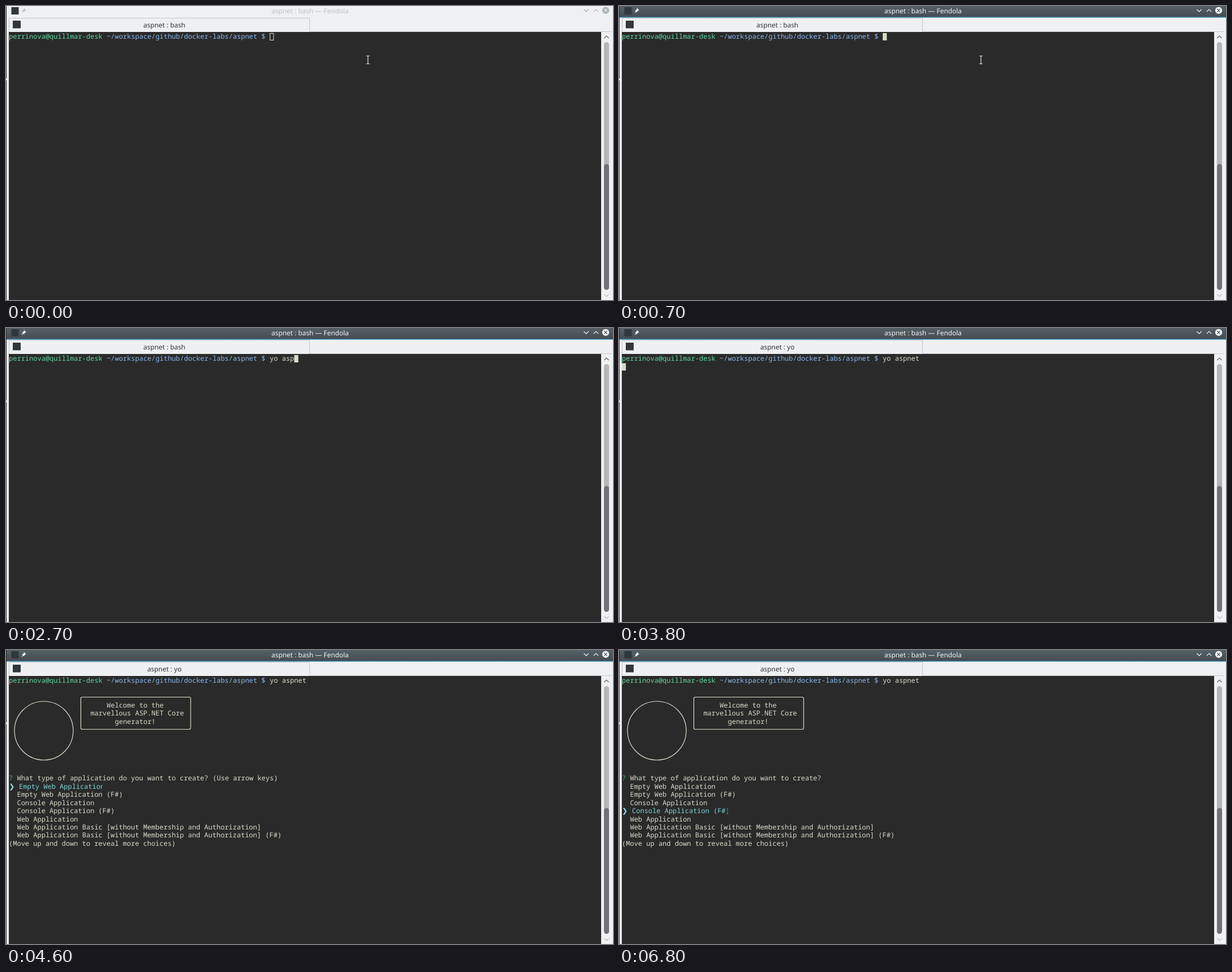
Recreate the animation shown at these times as an HTML page. Size 1075 px wide and 521 px high, loop 8 s.

```html
<!DOCTYPE html>
<html lang="en">
<head>
<meta charset="utf-8">
<title>Terminal</title>
<style>
  html, body { margin: 0; width: 100%; height: 100%; overflow: hidden; background: #eff0f1; }
  svg { display: block; width: 100%; height: 100%; }
  text { white-space: pre; text-rendering: geometricPrecision; }
  .ui { font: 11.9px "Noto Sans", sans-serif; text-anchor: middle; }
  .mono { font: 12.03px "Noto Sans Mono", monospace; }
  .line { fill: none; stroke-width: 1.2; }
</style>
</head>
<body>
<svg viewBox="0 0 1075 521" preserveAspectRatio="none">
  <defs>
    <linearGradient id="bar" x2="0" y2="1">
      <stop id="barTop"/>
      <stop id="barEnd" offset="1"/>
    </linearGradient>
    <clipPath id="pickClip"><rect id="pickBox" x="5" height="16"/></clipPath>
  </defs>
  <rect width="1075" height="521" fill="#eff0f1"/>

  <!-- title bar -->
  <g id="active">
    <rect width="1075" height="20" fill="url(#bar)"/>
    <rect y="19.6" width="1075" height="1.2" fill="#46a9d6"/>
  </g>
  <rect x="9.5" y="2" width="13" height="13" fill="#31373b"/>
  <g id="pin">
    <path d="M31.7 4.2L36 8.3L34 8.6L32.2 10.5L31.9 12L28.2 8.3L29.8 8L31.6 6.2Z" transform="translate(0 -.6)"/>
    <path d="M30.5 9L28 11.8" stroke-width="1.1"/>
  </g>
  <text id="title" class="ui" x="538.5" y="12.8">aspnet : bash — Fendola</text>
  <g id="buttons" class="line">
    <path d="M1023.3 6L1027.5 10.2L1031.7 6M1040.8 10.2L1045 6L1049.2 10.2"/>
  </g>
  <circle id="close" cx="1062" cy="7.8" r="6.1"/>
  <path id="cross" class="line" d="M1059.2 5L1064.8 10.6M1064.8 5L1059.2 10.6"/>

  <!-- tab bar -->
  <path class="line" d="M5.5 46V21.5H537.5V45.5H1072" stroke="#c3c5c7" style="stroke-width:1"/>
  <rect x="12" y="26" width="14" height="13.5" fill="#31373b"/>
  <text id="tab" class="ui" x="280.5" y="37.8" fill="#31363b"></text>

  <!-- terminal and scroll bar -->
  <rect x="5" y="46" width="1049" height="475" fill="#2a2a2a"/>
  <rect x="1059" y="64" width="9" height="439" rx="4.5" fill="#b5b6b8"/>
  <rect x="1059" y="280" width="9" height="223" rx="4.5" fill="#717177"/>
  <path class="line" d="M1059.5 57L1063.5 53L1067.5 57" stroke="#5c6165"/>
  <path class="line" d="M1059.5 511L1063.5 515L1067.5 511" stroke="#b9bcbe"/>
  <rect width="1" height="521" fill="#2b2b2b"/>
  <rect y="128.5" width="1" height="3" fill="#fff"/>

  <g id="prompt" class="mono"></g>
  <g id="greeting" class="mono">
    <circle class="line" cx="67" cy="143" r="52" stroke="#dcdccc"/>
    <rect class="line" x="132.5" y="83.5" width="194.5" height="57" rx="2.5" stroke="#dcdccc"/>
  </g>
  <g id="menu" class="mono">
    <g clip-path="url(#pickClip)"><text id="pick" x="23" fill="#7fd3d8"></text></g>
    <text id="arrow" x="5.2" fill="#8fe3ea" style="font-family:'DejaVu Sans',sans-serif">❯</text>
  </g>
  <rect id="cursor" width="7.2" height="13"/>

  <g id="pointer" class="line" stroke="#e8e8e8">
    <path d="M638 88.5H640L641 89.3L642 88.5H644M641 89V102M638 102.5H640L641 101.7L642 102.5H644"/>
  </g>
</svg>
<script>
const LOOP = 8000, CELL = 7.22, ROW = 14.42, CREAM = '#dcdccc';
const COMMAND = 'yo aspnet', PROMPT_COLS = 64, FIRST = 13;
const CHOICES = [
  'Empty Web Application',
  'Empty Web Application (F#)',
  'Console Application',
  'Console Application (F#)',
  'Web Application',
  'Web Application Basic [without Membership and Authorization]',
  'Web Application Basic [without Membership and Authorization] (F#)'
];
// [time, characters typed]
const KEYS = [[0, 0], [1100, 1], [1500, 2], [2400, 4], [2500, 5], [2700, 6], [2900, 7], [3000, 8], [3200, 9]];
const PICKS = [[0, 0], [6400, 1], [6600, 2], [6800, 3]];

const $ = id => document.getElementById(id);
const colX = col => 5 + col * CELL;
const baseY = row => 58.4 + row * ROW;
const valueAt = (steps, t) => steps.filter(s => s[0] <= t).pop()[1];
const show = (id, on) => $(id).setAttribute('visibility', on ? 'visible' : 'hidden');
const set = (id, attrs) => {
  for (const key in attrs) $(id).setAttribute(key, attrs[key]);
};

function write(parent, col, row, str, fill = CREAM) {
  const el = document.createElementNS('http://www.w3.org/2000/svg', 'text');
  el.setAttribute('x', colX(col));
  el.setAttribute('y', baseY(row));
  el.setAttribute('fill', fill);
  el.textContent = str;
  return $(parent).appendChild(el);
}

write('prompt', 0, 0, 'perrinova@quillmar-desk', '#5fd7a0');
write('prompt', 24, 0, '~/workspace/github/docker-labs/aspnet $', '#8ab8ee');
const typed = write('prompt', PROMPT_COLS, 0, '');
write('greeting', 24, 3, 'Welcome to the');
write('greeting', 20, 4, 'marvellous ASP.NET Core');
write('greeting', 26, 5, 'generator!');
write('menu', 0, 12, '?', '#4fa77f');
write('menu', 2, 12, 'What type of application do you want to create?');
const hint = write('menu', 50, 12, '(Use arrow keys)');
const items = CHOICES.map((label, i) => write('menu', 2, FIRST + i, label));
write('menu', 0, 20, '(Move up and down to reveal more choices)');

function drawWindow(t) {
  const on = t >= 600, fading = t < 700;
  const ink = on ? '#f4f5f5' : '#bfc3c6';
  show('active', on);
  set('barTop', { 'stop-color': fading ? '#687177' : '#566067' });
  set('barEnd', { 'stop-color': fading ? '#525c62' : '#434c52' });
  set('title', { fill: ink });
  set('pin', { fill: ink, stroke: ink, 'stroke-width': 0 });
  set('buttons', { stroke: on ? ink : '#a9afb3' });
  set('close', { fill: on ? '#fcfcfc' : '#a5b0b5' });
  set('cross', { stroke: on ? '#475057' : '#eff0f1' });
  $('tab').textContent = t < 3800 ? 'aspnet : bash' : 'aspnet : yo';
  show('pointer', t < 1100);
}

function drawShell(t) {
  const count = valueAt(KEYS, t), entered = t >= 3300, focus = t >= 600;
  typed.textContent = COMMAND.slice(0, count);
  const inset = focus ? 0 : 0.5;
  set('cursor', {
    x: colX(entered ? 0 : PROMPT_COLS + count) + inset,
    y: 48 + (entered ? ROW : 0) + inset,
    width: CELL - 2 * inset,
    height: 13 - 2 * inset,
    fill: focus ? '#d5dfc9' : 'none',
    stroke: focus ? 'none' : CREAM
  });
  show('cursor', t < 4500);
}

function drawMenu(t) {
  const index = valueAt(PICKS, t), y = baseY(FIRST + index);
  show('greeting', t >= 4500);
  $('menu').style.display = t >= 4600 ? '' : 'none';
  hint.style.display = t < 6400 ? '' : 'none';
  items.forEach((el, i) => { el.style.display = i === index ? 'none' : ''; });
  $('pick').textContent = CHOICES[index];
  set('pick', { y });
  set('arrow', { y });
  set('pickBox', { y: y - 11.5, width: (CHOICES[index].length + 2) * CELL });
}

function draw(t) {
  drawWindow(t);
  drawShell(t);
  drawMenu(t);
}

const start = performance.now();
function tick() {
  draw((performance.now() - start) % LOOP);
  requestAnimationFrame(tick);
}
tick();
</script>
</body>
</html>
```
